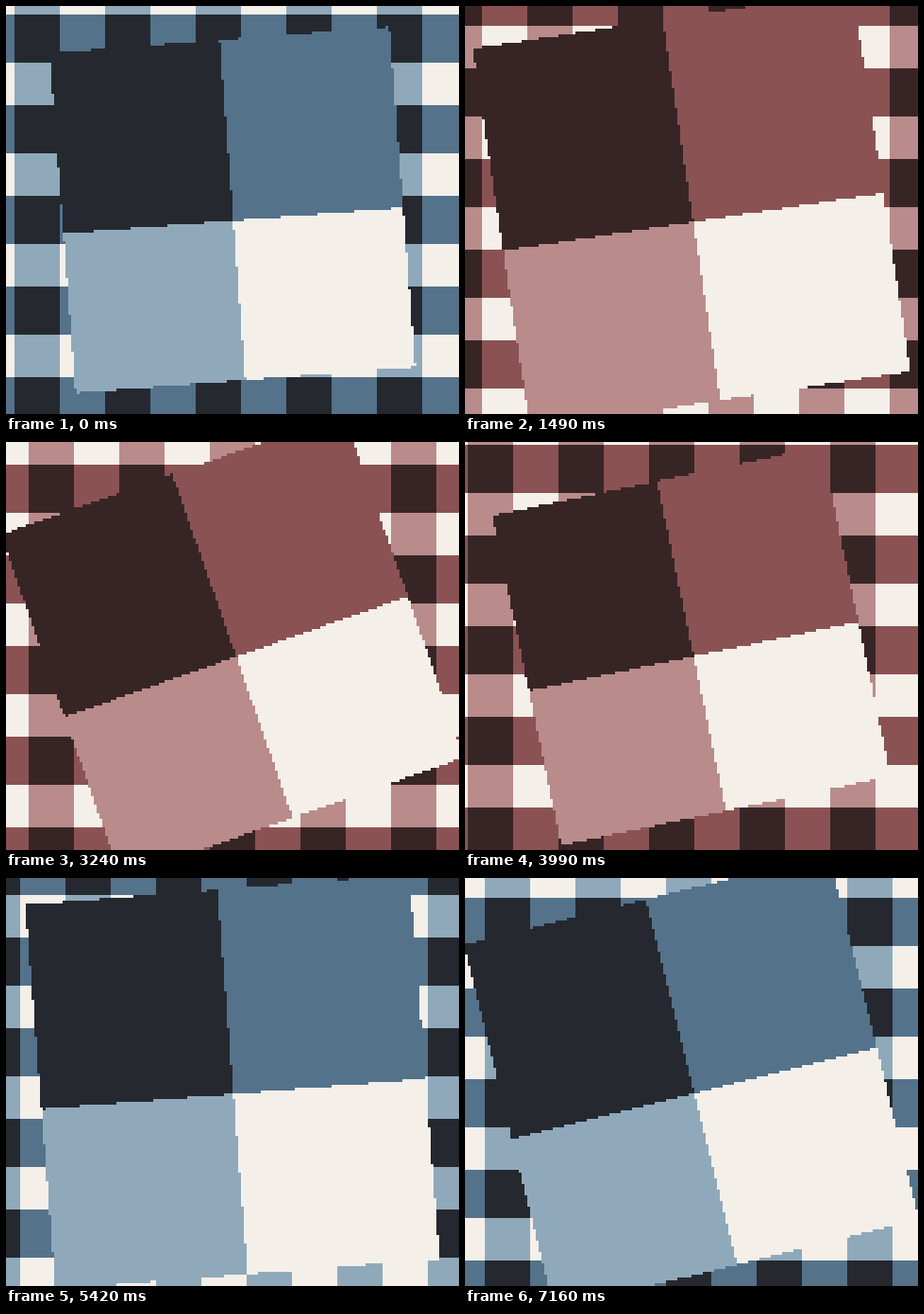
Write an HTML page with a canvas that moves like this. It is 480 px wide and 432 px high and loops after 7.26 s.

```html
<!DOCTYPE html>
<html lang="en">
<head>
<meta charset="utf-8">
<title>Checkered rotozoom</title>
<style>
  html, body { margin: 0; width: 100%; height: 100%; overflow: hidden; background: #f4efe9; }
  canvas { display: block; width: 480px; height: 432px; image-rendering: pixelated; }
</style>
</head>
<body>
<canvas id="screen" width="160" height="144"></canvas>
<script>
const WIDTH = 160, HEIGHT = 144, TILE = 32;
const LOOP = 7260, LAST = 7160, STEP = 30;

// Packed as ABGR for a little-endian pixel buffer.
const pack = hex => {
  const n = parseInt(hex, 16);
  return (255 << 24 | (n & 255) << 16 | (n & 0xff00) | n >> 16) >>> 0;
};
const BLUE = ['25282f', '54728a', '8fa9bb', 'f4efe9'].map(pack);
const RED = ['372526', '8a5253', 'b98b8b', 'f4efe9'].map(pack);

const ctx = document.getElementById('screen').getContext('2d');
const image = ctx.createImageData(WIDTH, HEIGHT);
const pixels = new Uint32Array(image.data.buffer);

// One tile is a 2x2 check whose upper row is slightly taller.
const check = (u, v) => (u >= 16 ? 1 : 0) + (v >= 17 ? 2 : 0);
const wave = (n, period, start) => Math.sin((n - start) / period * 2 * Math.PI);

function frameTime(t) {
  const early = (t >= 390 && t < 1870) || t >= 4100 ? 10 : 0;
  const time = Math.floor((t + early) / STEP) * STEP - early;
  return Math.max(0, Math.min(time, LAST));
}

function draw(time) {
  const n = time / STEP;
  const palette = time >= 270 && time < 4110 ? RED : BLUE;
  const scroll = Math.ceil(n / 4) - 3 + TILE;
  const angle = (22.7 + 21.5 * wave(n, 64, 10.4)) * Math.PI / 180;
  const zoom = 3.98 + 0.28 * wave(n, 32, 11.4);
  const c = Math.cos(angle) / zoom, s = Math.sin(angle) / zoom;

  for (let y = 0, i = 0; y < HEIGHT; y++) {
    const dy = y + 0.5 - HEIGHT / 2;
    for (let x = 0; x < WIDTH; x++, i++) {
      const dx = x + 0.5 - WIDTH / 2;
      let u = TILE / 2 + dx * c - dy * s;
      let v = TILE / 2 + dx * s + dy * c;
      if (u < 0 || v < 0 || u >= TILE || v >= TILE) {
        u = (x + scroll) % TILE;
        v = (y + scroll) % TILE;
      }
      pixels[i] = palette[check(u, v)];
    }
  }
  ctx.putImageData(image, 0, 0);
}

const start = performance.now();
let shown = -1;
function tick() {
  const time = frameTime((performance.now() - start) % LOOP);
  if (time !== shown) draw(shown = time);
  requestAnimationFrame(tick);
}
tick();
</script>
</body>
</html>
```
